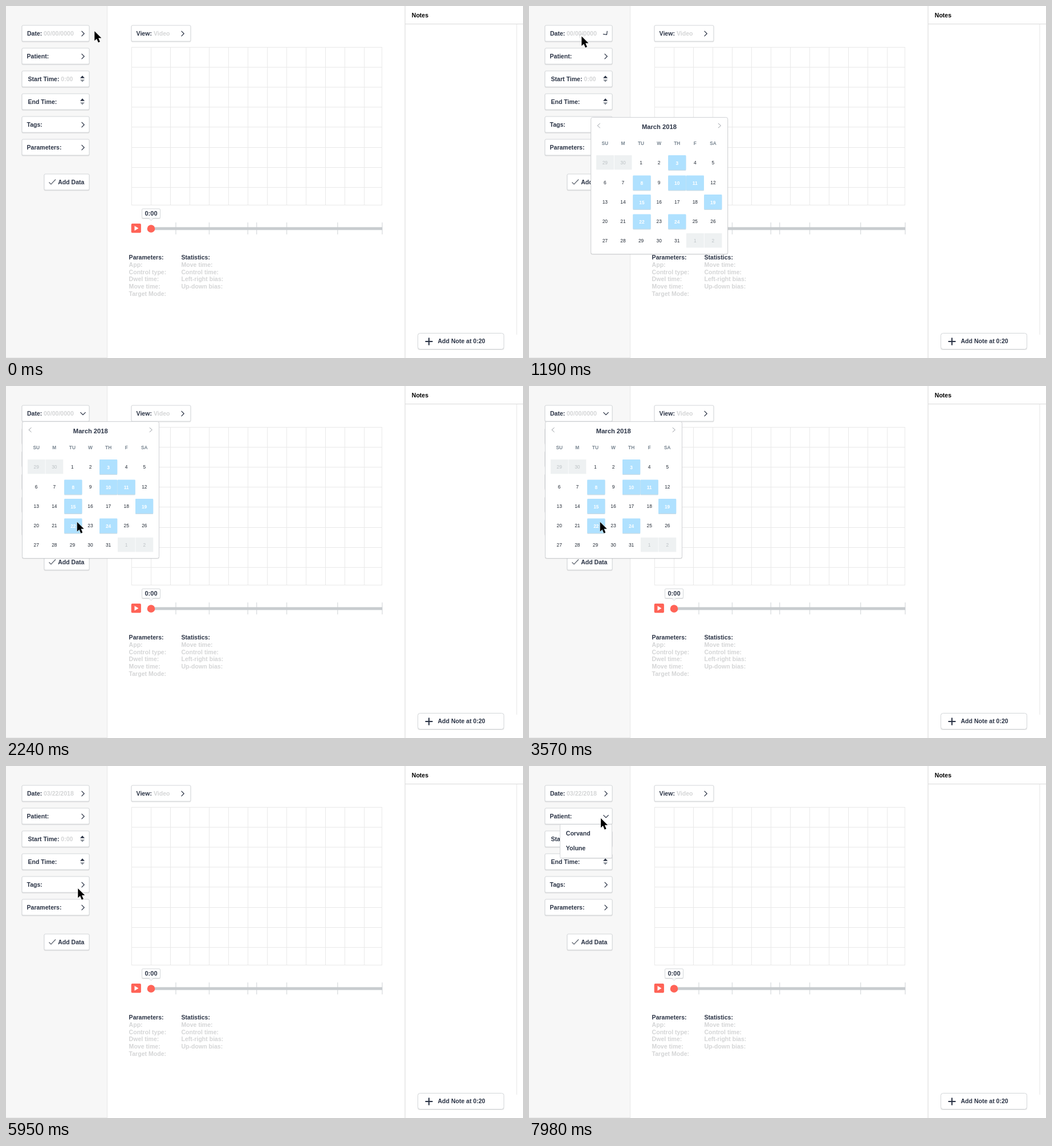
Write an HTML page that moves like this. It is 907 by 618 pixels and loops after 8 s.

```html
<!DOCTYPE html>
<html lang="en">
<head>
<meta charset="utf-8">
<title>Session review</title>
<style>
  html, body { margin: 0; width: 100%; height: 100%; overflow: hidden; background: #fff; }
  svg { display: block; width: 907px; height: 618px; }
  text { font: bold 10.55px "Liberation Sans", Arial, sans-serif; fill: #2a3345; }
  .grey { fill: #d4d5d6; }
  .title { font-size: 11.2px; }
  .mid { text-anchor: middle; }
  .day { font-size: 8.4px; font-weight: normal; text-anchor: middle; fill: #222a35; }
  .head { font-size: 8.3px; text-anchor: middle; fill: #76838f; }
  .off { fill: #bcc2c5; }
  .on { fill: #fff; font-weight: bold; }
  .line { fill: none; stroke: #2a3345; stroke-width: 1.2; }
</style>
</head>
<body>
<svg id="stage" viewBox="0 0 907 618"></svg>
<script>
const LOOP = 8000;
const stage = document.getElementById('stage');

const rect = (x, y, w, h, fill, extra = '') =>
  `<rect x="${x}" y="${y}" width="${w}" height="${h}" fill="${fill}" ${extra}/>`;
const text = (x, y, s, cls = '', extra = '') => `<text x="${x}" y="${y}" class="${cls}" ${extra}>${s}</text>`;
const path = (d, extra) => `<path d="${d}" ${extra}/>`;
const box = (x, y, w, h, r = 2) =>
  rect(x, y + 1, w, h, '#000', `rx="${r}" opacity=".1"`) +
  rect(x + .5, y + .5, w - 1, h - 1, '#fff', `rx="${r}" stroke="#d3d6d9"`);
const chevron = (x, y, id = '') =>
  `<g transform="translate(${x} ${y})"><path class="line" ${id && `id="${id}"`} d="M-2.4 -4.6L2.2 0L-2.4 4.6"/></g>`;
const spinner = y =>
  path(`M130 ${y - 1}L134 ${y - 5.6}L138 ${y - 1}Z`, 'fill="#2a3345"') +
  path(`M130 ${y + 1.4}L134 ${y + 5.6}L138 ${y + 1.4}Z`, 'fill="#8a9099"');

function sidebar() {
  const labels = [[37, 'Date:'], [36.5, 'Patient:'], [38.5, 'Start Time:'],
    [38.5, 'End Time:'], [36.5, 'Tags:'], [36.5, 'Parameters:']];
  let out = rect(0, 0, 178, 618, '#f7f7f7') + rect(177, 0, 1, 618, '#e8e8e8') + rect(0, 617, 178, 1, '#e8e8e8');
  labels.forEach(([x, label], i) => {
    const y = 33.5 + 40 * i;
    out += box(27.5, y, 119, 29) + text(x, y + 18.5, label);
    out += i === 2 || i === 3 ? spinner(y + 14.3) : chevron(135, y + 15, ['dateChevron', 'patientChevron'][i]);
  });
  return out +
    text(66, 52, '00/00/0000', 'grey', 'id="dateEmpty"') +
    text(66, 52, '03/22/2018', 'grey', 'id="dateSet"') +
    text(96.3, 132, '0:00', 'grey') +
    box(66.5, 294.5, 80, 29) + text(91.2, 313, 'Add Data') +
    path('M75.5 309.5L79 313L87 304.5', 'class="line" style="stroke:#59606b"');
}

function player() {
  let lines = '';
  for (let i = 0; i < 13; i++) lines += `M${220.5 + 34 * i} 72V350`;
  lines += 'M659.5 72V350';
  for (let i = 0; i < 8; i++) lines += `M220 ${Math.round(72 + 35.1 * i) + .5}H660`;
  lines += 'M220 349.5H660';
  const ticks = [298, 356.5, 424.3, 439.7, 492.5, 581.8, 660].map(x => `M${x} 380V401`).join('');
  return box(219.5, 33.5, 105, 29) + text(228.6, 52, 'View:') + text(259, 52, 'Video', 'grey') + chevron(310, 48.5) +
    path(lines, 'fill="none" stroke="#e9e9e9"') +
    path(ticks, 'stroke="#dcdfe1" stroke-width="1.4"') +
    rect(254, 388.3, 406, 5, '#c8cccf') +
    rect(219.7, 382, 17.2, 16.3, '#ff6357', 'rx="2"') +
    path('M225.5 386L232.5 390.3L225.5 394.6Z', 'fill="#fff"') +
    '<circle cx="254.5" cy="391" r="6.8" fill="#ff6357"/>' +
    box(238, 355.5, 33, 17.5) +
    path('M250.5 372.5L254.5 376.5L258.5 372.5', 'fill="#fff" stroke="#d3d6d9"') +
    text(254.5, 368, '0:00', 'mid', 'style="font-size:11px"');
}

function facts() {
  const column = (x, head, items) => text(x, 445, head) +
    items.map((s, i) => text(x, 458 + 12.65 * i, s, 'grey')).join('');
  return column(215.6, 'Parameters:', ['App:', 'Control type:', 'Dwel time:', 'Move time:', 'Target Mode:']) +
    column(307.5, 'Statistics:', ['Move time:', 'Control time:', 'Left-right bias:', 'Up-down bias:']);
}

function notes() {
  return rect(699.5, 0, 1.2, 618, '#dedede') + rect(700, 31, 207, 1.2, '#dedede') + rect(895.5, 32, 1, 545, '#e6e6e6') +
    text(711.8, 19.7, 'Notes', '', 'style="fill:#000"') +
    box(722, 574, 152, 29, 4) + text(757.5, 592.3, 'Add Note at 0:20') +
    path('M735.5 589H748.5M742 582.5V595.5', 'class="line" style="stroke-width:2"');
}

function calendar() {
  const rows = [141.5, 177, 210.7, 244.8, 278.7];
  const tops = [129, 164.5, 198, 232.5, 266];
  const free = [3, 8, 10, 11, 15, 19, 22, 24];
  let out = rect(28, 63.5, 241, 240, '#000', 'rx="3" opacity=".13"') +
    rect(28.5, 62.5, 240, 240, '#fff', 'rx="3" stroke="#cfd1d4"') +
    text(148.3, 83, 'March 2018', 'title mid') +
    path('M44.5 73L40 77L44.5 81M251.8 73L256.3 77L251.8 81', 'fill="none" stroke="#9a9fa5"');
  ['SU', 'M', 'TU', 'W', 'TH', 'F', 'SA'].forEach((d, i) => out += text(53.2 + 31.6 * i, 110.6, d, 'head'));
  for (let i = 0; i < 35; i++) {
    const col = i % 7, row = Math.floor(i / 7), n = i - 1;
    const outside = n < 1 || n > 31;
    const marked = !outside && free.includes(n);
    const x = 53.2 + 31.6 * col;
    const label = n < 1 ? n + 30 : n > 31 ? n - 31 : n;
    if (outside) out += rect(x - 15.3, tops[row], 30.8, 25.3, '#eef1f2');
    if (marked) {
      const left = col === 2 ? 102.2 : 164 + 31.5 * (col - 4);
      out += rect(left, tops[row] + 1, 31.2, 26, '#9bbdd2', 'rx="1" opacity=".55"') +
        rect(left, tops[row], 31.2, 25.8, '#afe1ff', 'rx="1"') +
        text(left + 15.6, rows[row] + 4.3, label, 'day on');
    } else {
      out += text(x, rows[row] + 3, label, outside ? 'day off' : 'day');
    }
  }
  return `<g id="calendar">${out}</g>`;
}

function menu() {
  return '<g id="menu">' + rect(55, 103, 91, 60, '#000', 'rx="2" opacity=".1"') +
    rect(54.5, 102.5, 91, 59, '#fff', 'rx="2" stroke="#d3d6d9"') +
    text(64.8, 122.2, 'Corvand') + text(64.8, 147.5, 'Yolune') + '</g>';
}

const pointer = '<circle id="ring" cx="92.5" cy="53" r="4" fill="#fff" fill-opacity=".4" stroke="#aaa" stroke-width=".8"/>' +
  path('M0 0V16.6L3.8 13.1L6.6 19.8L9.6 18.5L6.8 12H12Z', 'id="pointer" stroke="#fff" stroke-width=".9" paint-order="stroke"');

stage.innerHTML = sidebar() + player() + facts() + notes() + menu() + calendar() + pointer;
const el = id => document.getElementById(id);

const clamp = v => Math.max(0, Math.min(1, v));
const span = (t, start, length) => clamp((t - start) / length);
const smooth = p => p * p * (3 - 2 * p);

// cubic-bezier(.25, .1, .25, 1)
function ease(p) {
  if (p <= 0 || p >= 1) return p;
  const curve = (a, b, s) => 3 * a * s * (1 - s) ** 2 + 3 * b * s * s * (1 - s) + s ** 3;
  let lo = 0, hi = 1;
  for (let i = 0; i < 24; i++) {
    const mid = (lo + hi) / 2;
    if (curve(.25, .25, mid) < p) lo = mid; else hi = mid;
  }
  return curve(.1, 1, lo);
}

// time, x, y
const route = [
  [20, 155.3, 44.3], [880, 92.3, 53.3], [1500, 92.3, 53.3], [1920, 233, 291], [2240, 124.7, 238.8],
  [4410, 124.7, 238.8], [4800, 126.3, 248.3], [5680, 126.3, 248.3], [6590, 126, 91.7]
];

function pointerAt(t) {
  const next = route.findIndex(k => k[0] > t);
  if (next === 0) return route[0].slice(1);
  if (next < 0) return route[route.length - 1].slice(1);
  const a = route[next - 1], b = route[next];
  const p = smooth((t - a[0]) / (b[0] - a[0]));
  return [a[1] + (b[1] - a[1]) * p, a[2] + (b[2] - a[2]) * p];
}

function show(id, opacity) {
  el(id).setAttribute('opacity', opacity);
  el(id).setAttribute('visibility', opacity > 0 ? 'visible' : 'hidden');
}

function render(t) {
  const open = ease(span(t, 1045, 430));
  const close = ease(span(t, 4390, 430));
  const list = ease(span(t, 7190, 430));
  const chosen = span(t, 3940, 330);

  el('calendar').setAttribute('transform', `translate(${194 * (1 - open)} ${322 * (1 - open)})`);
  show('calendar', t < 1045 ? 0 : 1 - close);
  el('dateChevron').setAttribute('transform', `rotate(${90 * (open - close)})`);
  show('dateEmpty', 1 - chosen);
  show('dateSet', chosen);
  el('patientChevron').setAttribute('transform', `rotate(${90 * list})`);
  show('menu', list);
  show('ring', t < 980 ? 0 : .7 * (1 - span(t, 1120, 200)));
  el('pointer').setAttribute('transform', `translate(${pointerAt(t)})`);
}

function tick() {
  render(performance.now() % LOOP);
  requestAnimationFrame(tick);
}
tick();
</script>
</body>
</html>
```
